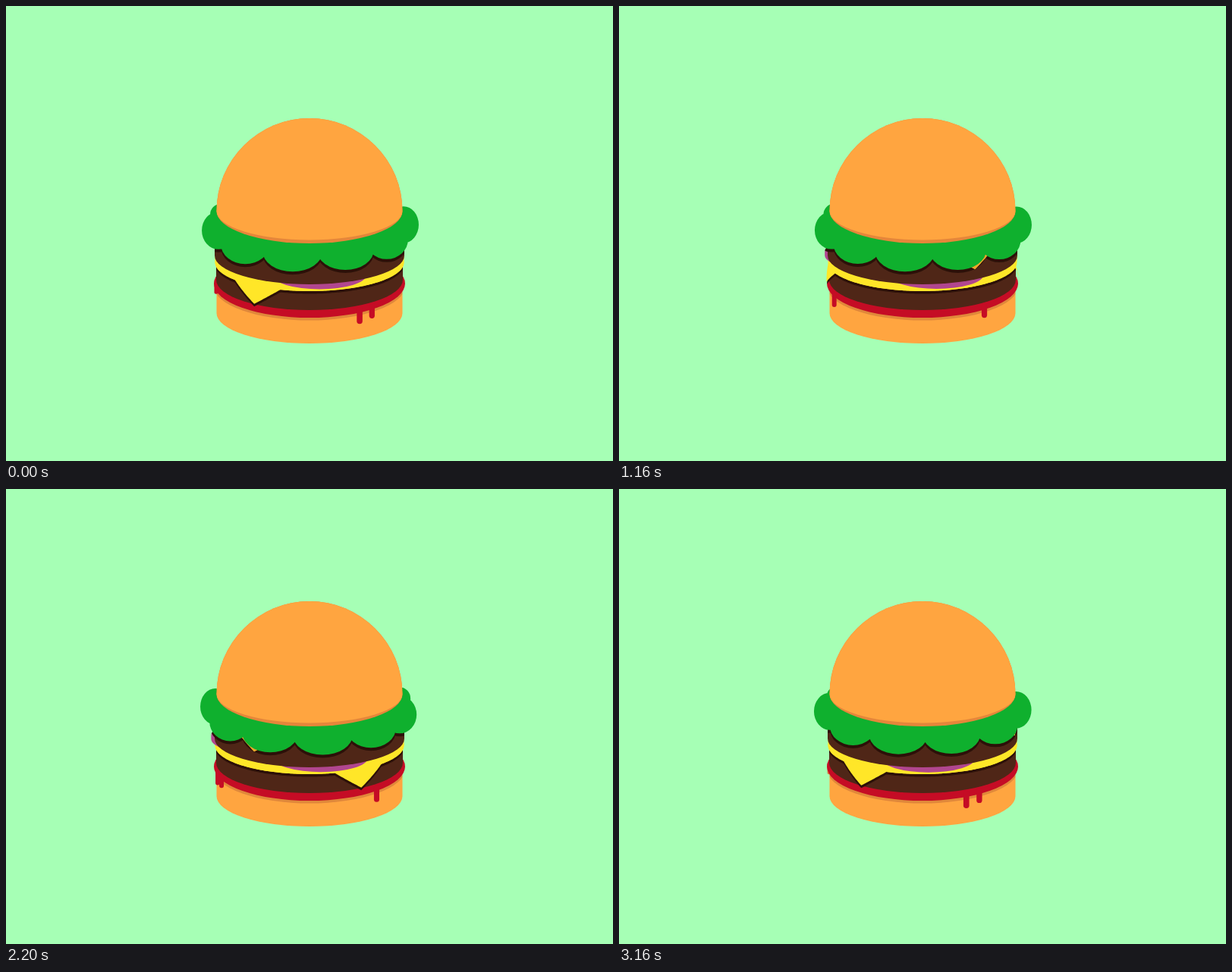
An HTML page with a canvas that plays this animation: 800x600 px, repeating every 3.2 s.

```html
<!DOCTYPE html>
<html lang="en">
<head>
<meta charset="utf-8">
<title>Spinning burger</title>
<style>
  html, body { margin: 0; width: 100%; height: 100%; overflow: hidden; background: #a6ffb5; }
  canvas { display: block; }
</style>
</head>
<body>
<canvas id="stage" width="800" height="600"></canvas>
<script>
const ctx = document.getElementById('stage').getContext('2d');
const LOOP = 3200, STEP = 40, CX = 400, DEG = Math.PI / 180;

const BUN = '#ffa540', PATTY = '#4f2617', DARK = '#2c1008', CHEESE = '#ffe628',
      SAUCE = '#c50c25', ONION = '#b1468f', LEAF = '#0fb02e';

// Angles in degrees at the start of the turn; 0 faces the viewer.
const LOBES = 11, LOBE_START = 22.4;
const ONIONS = [11, 125, -115];
const LOW_CORNERS = [-35, 145], TOP_CORNERS = [-97.5, 77.5];
const DRIPS = [[32.5, 383], [42, 380], [-89, 379], [158.5, 383]];

function fill(path, color) {
  ctx.fillStyle = color;
  ctx.fill(path);
}

// Paints a path moved down, only over what is already drawn.
function shade(path, dy, color) {
  ctx.save();
  ctx.globalCompositeOperation = 'source-atop';
  ctx.translate(0, dy);
  fill(path, color);
  ctx.restore();
}

function addEllipse(path, x, y, rx, ry) {
  path.moveTo(x + rx, y);
  path.ellipse(x, y, rx, ry, 0, 0, 2 * Math.PI);
}

// Upright wall with a rounded front edge.
function drum(top, bottom, rx, ry) {
  const p = new Path2D();
  p.moveTo(CX - rx, top);
  p.lineTo(CX + rx, top);
  p.lineTo(CX + rx, bottom);
  p.ellipse(CX, bottom, rx, ry, 0, 0, Math.PI);
  p.closePath();
  return p;
}

function dome(ry) {
  const p = new Path2D();
  p.ellipse(CX, 270.5, 122.5, 122.5, 0, Math.PI, 2 * Math.PI);
  p.ellipse(CX, 270.5, 122.5, ry, 0, 0, Math.PI);
  p.closePath();
  return p;
}

function angleGap(a, b) {
  return Math.abs(((a - b + 180) % 360 + 360) % 360 - 180);
}

function cheeseSlice(cy, corners, turn) {
  const p = new Path2D();
  for (let a = -180; a < 180; a++) {
    // sampled relative to the slice, so that the tips stay sharp
    let peak = 0;
    for (const c of corners) peak = Math.max(peak, 1 - angleGap(a + corners[0], c) / 17);
    const t = (a + corners[0] + turn) * DEG;
    p.lineTo(CX + (124.5 + 2.5 * peak) * Math.sin(t),
             cy + (38 + 2 * peak) * Math.cos(t) + 22 * peak);
  }
  p.closePath();
  return p;
}

function lettuce(turn) {
  const p = new Path2D();
  addEllipse(p, CX, 287, 122, 38);
  for (let i = 0; i < LOBES; i++) {
    const t = (LOBE_START + turn + i * 360 / LOBES) * DEG;
    const s = Math.sin(t), c = Math.cos(t);
    const size = Math.min(1, 1 + 1.3 * c);
    if (size < 0.2) continue;
    addEllipse(p, CX + 124 * s, 287 + 37 * c,
               size * Math.hypot(40 * c, 20 * s),
               size * (24 + 3 * Math.max(0, c)));
  }
  return p;
}

function drawDrips(turn, front) {
  ctx.strokeStyle = SAUCE;
  ctx.lineCap = 'round';
  for (const [angle, end] of DRIPS) {
    const t = (angle + turn) * DEG, c = Math.cos(t);
    if ((c >= 0) !== front) continue;
    const x = CX + 123 * Math.sin(t), w = 5 + 3 * Math.abs(c);
    ctx.lineWidth = w;
    ctx.beginPath();
    ctx.moveTo(x, 366 + 40 * c);
    ctx.lineTo(x, end + 43 * c - w / 2);
    ctx.stroke();
  }
}

function drawOnions(turn) {
  const p = new Path2D();
  for (const angle of ONIONS) {
    const t = (angle + turn) * DEG;
    const x = CX + 69 * Math.sin(t), y = 329 + 21 * Math.cos(t);
    addEllipse(p, x, y, 62, 18.8);
    addEllipse(p, x, y + 5, 62, 18.8);
    p.rect(x - 62, y, 124, 5);
  }
  fill(p, ONION);
}

function draw(turn) {
  ctx.clearRect(0, 0, 800, 600);

  const sauce = new Path2D();
  addEllipse(sauce, CX, 366, 126, 45);
  const lowCheese = cheeseSlice(338, LOW_CORNERS, turn);
  const topCheese = cheeseSlice(291.5, TOP_CORNERS, turn);
  const leaf = lettuce(turn);

  drawDrips(turn, false);
  fill(drum(375, 405, 122.5, 40), BUN);
  shade(sauce, 3.5, '#e0883a');
  fill(sauce, SAUCE);
  drawDrips(turn, true);

  fill(drum(335, 361, 123, 40), PATTY);
  shade(lowCheese, 3.5, DARK);
  fill(lowCheese, CHEESE);
  fill(drum(330, 338, 124.5, 38), CHEESE);

  drawOnions(turn);
  fill(drum(290, 329, 125, 38), PATTY);
  shade(leaf, 4, DARK);

  fill(topCheese, CHEESE);
  ctx.save();
  ctx.clip(topCheese);
  shade(leaf, 4, '#efa52a');
  ctx.restore();

  fill(leaf, LEAF);
  fill(dome(42.5), '#e5863a');
  fill(dome(38), BUN);
}

function tick(now) {
  const t = Math.floor(now % LOOP / STEP) * STEP;
  draw(t / LOOP * 360);
  requestAnimationFrame(tick);
}
draw(0);
requestAnimationFrame(tick);
</script>
</body>
</html>
```
